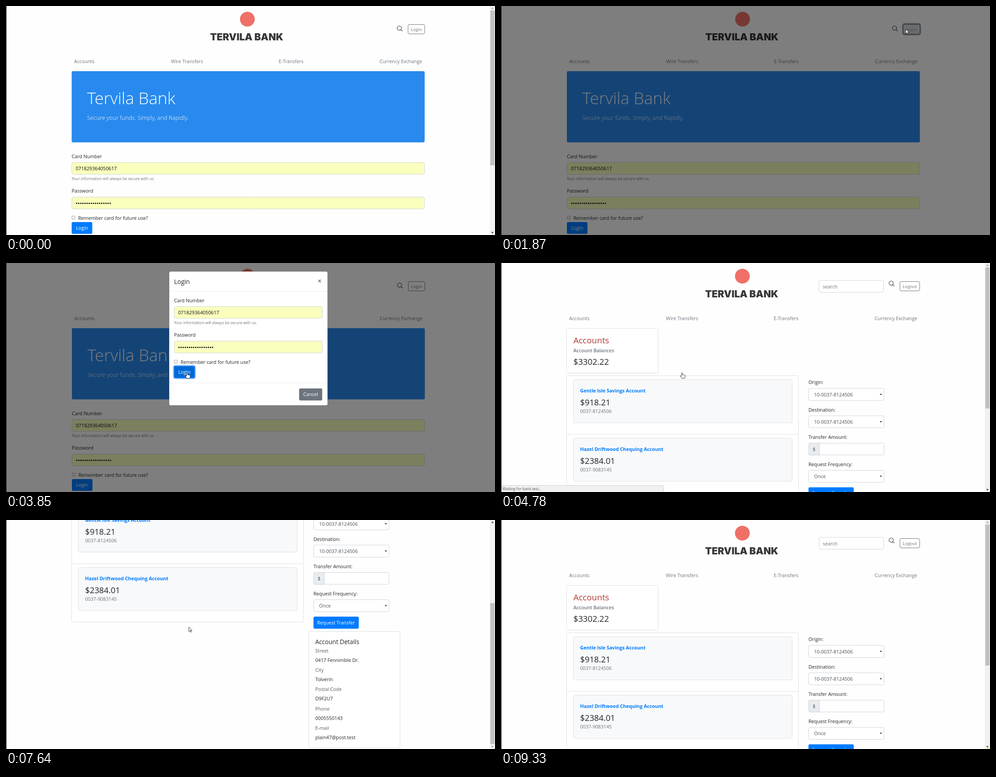
Animation of 1091x513 px, one loop 9.44 s. Source, as an HTML page with a canvas:

```html
<!DOCTYPE html>
<html lang="en">
<head>
<meta charset="utf-8">
<title>Online banking</title>
<style>
html, body { margin: 0; width: 100%; height: 100%; overflow: hidden; background: #fff; }
canvas { display: block; width: 1091px; height: 513px; }
</style>
</head>
<body>
<canvas id="stage" width="1091" height="513"></canvas>
<script>
const W = 1091, H = 513, LOOP = 9440;
const ctx = document.getElementById('stage').getContext('2d');

const BASE = 10.7, SMALL = 8.5;
const INK = '#212529', GREY = '#6c757d', FIELD = '#495057', LINE = '#ced4da', EDGE = '#dfdfdf', BLUE = '#007bff';
const NAME = 'Tervila Bank', CARD = '071829364050617';
const SAVINGS = '0037-8124506', CHEQUING = '0037-9083145';

const clamp = k => Math.max(0, Math.min(1, k));
const ramp = (t, a, b) => clamp((t - a) / (b - a));
const smooth = k => k * k * (3 - 2 * k);
const easeOut = (k, p) => 1 - Math.pow(1 - k, p);

// Text is placed by the middle of its capitals.
function text(s, x, mid, { size = BASE, color = INK, weight = 400, align = 'left', font = 'Open Sans' } = {}) {
  ctx.font = `${weight} ${size}px "${font}", "Noto Sans", sans-serif`;
  ctx.textAlign = align;
  ctx.fillStyle = color;
  ctx.fillText(s, x, mid + size * 0.357);
}

function box(x, y, w, h, fill, stroke, r = 3) {
  ctx.beginPath();
  ctx.roundRect(x, y, w, h, r);
  if (fill) { ctx.fillStyle = fill; ctx.fill(); }
  if (stroke) { ctx.strokeStyle = stroke; ctx.lineWidth = 1; ctx.stroke(); }
}

function rule(x1, x2, y, color) {
  ctx.fillStyle = color;
  ctx.fillRect(x1, y, x2 - x1, 1);
}

function withAlpha(a, draw) {
  ctx.save();
  ctx.globalAlpha *= a;
  draw();
  ctx.restore();
}

function ring(x, y, w, h, color, a) {
  if (a > 0) withAlpha(a, () => {
    ctx.beginPath();
    ctx.roundRect(x - 1.2, y - 1.2, w + 2.4, h + 2.4, 4);
    ctx.strokeStyle = color;
    ctx.lineWidth = 2.4;
    ctx.stroke();
  });
}

function button(label, x, y, w, h, fill) {
  box(x, y, w, h, fill);
  text(label, x + w / 2, y + h / 2, { color: '#fff', align: 'center' });
}

function searchIcon(x, y) {
  ctx.beginPath();
  ctx.arc(x, y, 4.7, 0, 7);
  ctx.moveTo(x + 3.4, y + 3.4);
  ctx.lineTo(x + 7, y + 7);
  ctx.strokeStyle = '#4d4d4d';
  ctx.lineWidth = 1.3;
  ctx.stroke();
}

function outlineButton(label, x, w, hover = 0, focus = 0) {
  const at = { size: 9.7, align: 'center' };
  ring(x, 41, w, 22, 'rgba(108,117,125,.7)', focus);
  withAlpha(hover, () => box(x, 41.5, w, 21, GREY));
  box(x, 41.5, w, 21, null, GREY);
  withAlpha(1 - hover, () => text(label, x + w / 2, 52.5, { ...at, color: GREY }));
  withAlpha(hover, () => text(label, x + w / 2, 52.5, { ...at, color: '#fff' }));
}

function header() {
  ctx.fillStyle = '#ee7067';
  ctx.beginPath();
  ctx.arc(538.5, 29.5, 16.5, 0, 7);
  ctx.fill();
  text(NAME.toUpperCase(), 537, 69, { size: 21.5, weight: 900, color: '#383838', align: 'center', font: 'Inter' });
  const nav = { color: GREY };
  text('Accounts', 152, 124, nav);
  text('Wire Transfers', 368, 124, nav);
  text('E-Transfers', 608.5, 124, nav);
  text('Currency Exchange', 928.5, 124, { ...nav, align: 'right' });
}

function loginForm(x, y, w, hover = 0, press = 0, focus = 0) {
  const input = dy => box(x + .5, y + dy, w - 1, 26.5, '#faffbd', LINE);
  text('Card Number', x, y);
  input(13.5);
  text(CARD, x + 9, y + 27.5, { color: '#111' });
  text('Your information will always be secure with us.', x, y + 50, { size: SMALL, color: GREY });
  text('Password', x, y + 77);
  input(91);
  ctx.fillStyle = '#111';
  for (let i = 0; i < 17; i++) {
    ctx.beginPath();
    ctx.arc(x + 11 + i * 4.68, y + 105, 1.6, 0, 7);
    ctx.fill();
  }
  box(x + .5, y + 133.5, 7, 7, '#f4f4f4', '#a5a5a5', 1);
  text('Remember card for future use?', x + 14.5, y + 138.5);
  ring(x, y + 147, 46, 26.5, 'rgba(0,123,255,.5)', focus);
  button('Login', x, y + 147, 46, 26.5, BLUE);
  withAlpha(hover, () => button('Login', x, y + 147, 46, 26.5, '#0069d9'));
  withAlpha(press, () => button('Login', x, y + 147, 46, 26.5, '#005cbf'));
}

function homePage(t) {
  header();
  searchIcon(877.5, 49.5);
  const hover = ramp(t, 1000, 1150) * (1 - ramp(t, 1760, 1910));
  const focus = ramp(t, 1280, 1430) * (1 - ramp(t, 2060, 2210));
  outlineButton('Login', 897, 37, hover, focus);
  box(146.5, 146, 787.5, 159.5, '#288aee');
  text(NAME, 181, 207, { size: 37, weight: 300, color: '#fff' });
  text('Secure your funds. Simply, and Rapidly.', 181, 250.5, { size: 13, weight: 300, color: '#fff' });
  loginForm(146.5, 337, 787.5);
}

function modal(t) {
  const k = ramp(t, 1880, 2200);
  if (!k) return;
  ctx.save();
  ctx.globalAlpha = ramp(t, 1880, 2040);
  ctx.translate(0, -75 * (1 - easeOut(k, 2)));
  box(364, 19, 353.5, 300, '#fff', 'rgba(0,0,0,.2)', 3.5);
  text('Login', 375, 42, { size: 13.8, weight: 500 });
  text('×', 699.5, 40.5, { size: 16, weight: 700, color: '#7f7f7f', align: 'center' });
  rule(364.5, 717, 63, '#e9ecef');
  loginForm(375, 84, 331, ramp(t, 3000, 3150),
    ramp(t, 3570, 3640) * (1 - ramp(t, 3700, 3850)), ramp(t, 3570, 3720));
  rule(364.5, 717, 268, '#e9ecef');
  button('Cancel', 654, 281, 51.5, 27, GREY);
  ctx.restore();
}

function select(label, value, y) {
  text(label, 686, y);
  box(686.5, y + 13.5, 168, 27, '#fff', LINE);
  text(value, 698.5, y + 27.5, { color: FIELD });
  triangle(847.5, y + 27, 2.2, 1, '#333');
}

function account(title, amount, number, y) {
  box(161.5, y, 488, 96.5, '#f8f9fa', EDGE);
  text(title, 176.5, y + 24.5, { weight: 700, color: BLUE });
  text(amount, 176.5, y + 51, { size: 18.3, weight: 500 });
  text(number, 176.5, y + 71, { color: GREY });
}

function accountPage() {
  header();
  box(709.5, 39, 144, 26.5, '#fff', LINE);
  text('search', 718, 53, { color: GREY });
  searchIcon(870.5, 45);
  outlineButton('Logout', 890, 44);

  box(146.5, 146.5, 204, 100, '#fff', EDGE);
  text('Accounts', 161.5, 173.5, { size: 18.8, weight: 500, color: '#b23a31' });
  text('Account Balances', 161.5, 196.5, { weight: 600, color: GREY });
  text('$3302.22', 161.5, 221.5, { size: 18.6, weight: 500 });

  box(146.5, 252.5, 517, 262, '#fff', EDGE);
  rule(147, 664, 383.5, EDGE);
  account('Gentle Isle Savings Account', '$918.21', SAVINGS, 261.5);
  account('Hazel Driftwood Chequing Account', '$2384.01', CHEQUING, 392.5);

  select('Origin:', '10-' + SAVINGS, 267.5);
  select('Destination:', '10-' + SAVINGS, 328.7);
  text('Transfer Amount:', 686, 389.7);
  box(686.5, 403.5, 168, 26.5, '#fff', LINE);
  box(686.5, 403.5, 24, 26.5, '#e9ecef', LINE, [3, 0, 0, 3]);
  text('$', 698.5, 417, { color: FIELD, align: 'center' });
  select('Request Frequency:', 'Once', 451);
  button('Request Transfer', 686, 502.5, 101, 27, BLUE);

  box(675.5, 535.5, 203.5, 260.5, '#fff', EDGE);
  text('Account Details', 690, 559, { size: 13.6, weight: 500 });
  [['Street', '0417 Fennimble Dr.'], ['City', 'Tolverin'], ['Postal Code', 'D9F2U7'],
   ['Phone', '0005550143'], ['E-mail', 'plain47@post.test']].forEach(([label, value], i) => {
    const y = 578.7 + i * 43.4;
    text(label, 690, y, { weight: 500, color: '#555d64' });
    text(value, 690, y + 21);
  });
}

function triangle(x, y, r, dir, color) {
  ctx.beginPath();
  ctx.moveTo(x - r, y - dir * r * .7);
  ctx.lineTo(x + r, y - dir * r * .7);
  ctx.lineTo(x, y + dir * r * .9);
  ctx.fillStyle = color;
  ctx.fill();
}

function scrollbar(y, pageHeight) {
  const track = 492, end = y + H >= pageHeight - 1;
  ctx.fillStyle = '#f1f1f1';
  ctx.fillRect(1079.5, 0, 11.5, H);
  ctx.fillStyle = '#c1c1c1';
  ctx.fillRect(1080.5, 10 + track * y / pageHeight, 9.5, track * H / pageHeight);
  triangle(1085.3, 5, 2.6, -1, y > 0 ? '#505050' : '#a3a3a3');
  triangle(1085.3, 508, 2.6, 1, end ? '#a3a3a3' : '#505050');
}

function scrollAt(t) {
  if (t < 6330) return 0;
  const q = 6330 + Math.floor((t - 6330) / 50) * 50;
  return (215 * smooth(ramp(q, 6264, 6690)) + 71 * smooth(ramp(q, 6950, 7130)))
    * (1 - smooth(ramp(q, 7680, 8200)));
}

function statusBar() {
  box(-2, 498.5, 365, 18, '#f1f1f1', '#cfcfcf');
  text('Waiting for bank.test...', 3, 506.5, { size: 8.4, color: '#555' });
}

// time, x, y and easing power of the way there
const path = [
  [170, 1034, 522, 1], [1080, 903, 52, 1.6], [2230, 903, 52, 1], [2650, 517, 182, 1],
  [3190, 404, 252, 2], [3320, 404, 246, 1], [5770, 404, 246, 1], [5870, 405, 244, 1],
  [6070, 406, 245, 1], [7600, 406, 245, 1], [7640, 408, 240, 1], [8050, 412, 244, 1],
  [8590, 896, 502, 1.3], [8640, 900, 525, 1]
];

function pointerAt(t) {
  const i = path.findIndex(p => p[0] > t);
  if (i < 1) return null;
  const [t0, x0, y0] = path[i - 1], [t1, x1, y1, p] = path[i];
  const k = easeOut(ramp(t, t0, t1), p);
  return [x0 + (x1 - x0) * k, y0 + (y1 - y0) * k];
}

function pointerKind(t, x, y) {
  const inside = (l, top, r, b) => x > l && x < r && y > top && y < b;
  if (t < 1700) {
    if (inside(897, 41, 934, 63)) return 'hand';
    return inside(147, 350, 934, 455) ? 'beam' : 'arrow';
  }
  if (t > 2200 && t < 4780) {
    if (inside(375, 97, 706, 125) || inside(375, 175, 706, 202)) return 'beam';
    return inside(375, 231, 421, 257) ? 'hand' : 'arrow';
  }
  return t >= 4780 && t < 5770 ? 'hand' : 'arrow';
}

const shapes = {
  arrow: new Path2D('M0 0V10L2.3 7.9L3.9 11.4L5.5 10.7L4 7.3H7Z'),
  hand: new Path2D('M-1.2 7.6V.8Q0-.8 1.2.8V4.6Q2.4 3.7 3.2 4.9Q4.5 4.1 5.2 5.3Q6.8 4.8 7 6.4V9L5.8 12.4H-.4L-3.7 8Q-3.9 6.1-2.3 6.7Z'),
  beam: new Path2D('M-2-4.7H-.7L0-4L.7-4.7H2M0-4V4M-2 4.7H-.7L0 4L.7 4.7H2')
};

function pointer(t) {
  const at = pointerAt(t);
  if (!at) return;
  const kind = pointerKind(t, ...at);
  ctx.save();
  ctx.translate(...at);
  ctx.strokeStyle = '#222';
  ctx.lineWidth = .9;
  ctx.lineJoin = 'round';
  ctx.fillStyle = '#fff';
  if (kind !== 'beam') ctx.fill(shapes[kind]);
  ctx.stroke(shapes[kind]);
  ctx.restore();
}

function draw(t) {
  ctx.fillStyle = '#fefefe';
  ctx.fillRect(0, 0, W, H);
  if (t < 4780) {
    const locked = t >= 1650;
    ctx.save();
    if (locked) ctx.translate(.5, 0);
    homePage(t);
    ctx.restore();
    if (!locked) scrollbar(0, 727);
    ctx.fillStyle = `rgba(0,0,0,${.5 * ramp(t, 1660, 1820)})`;
    ctx.fillRect(0, 0, W, H);
    modal(t);
  } else {
    const y = scrollAt(t);
    ctx.save();
    ctx.translate(0, -y);
    accountPage();
    ctx.restore();
    scrollbar(y, 799);
  }
  if (t >= 4200 && t < 6530) statusBar();
  ctx.fillStyle = '#000';
  ctx.fillRect(0, 0, 1, H);
  pointer(t);
  if (t >= 9330) {
    ctx.fillStyle = 'rgba(255,240,60,.5)';
    ctx.beginPath();
    ctx.arc(1088, 518, 9, 0, 7);
    ctx.fill();
  }
}

const start = performance.now();
function tick() {
  draw((performance.now() - start) % LOOP);
  requestAnimationFrame(tick);
}
tick();
</script>
</body>
</html>
```
